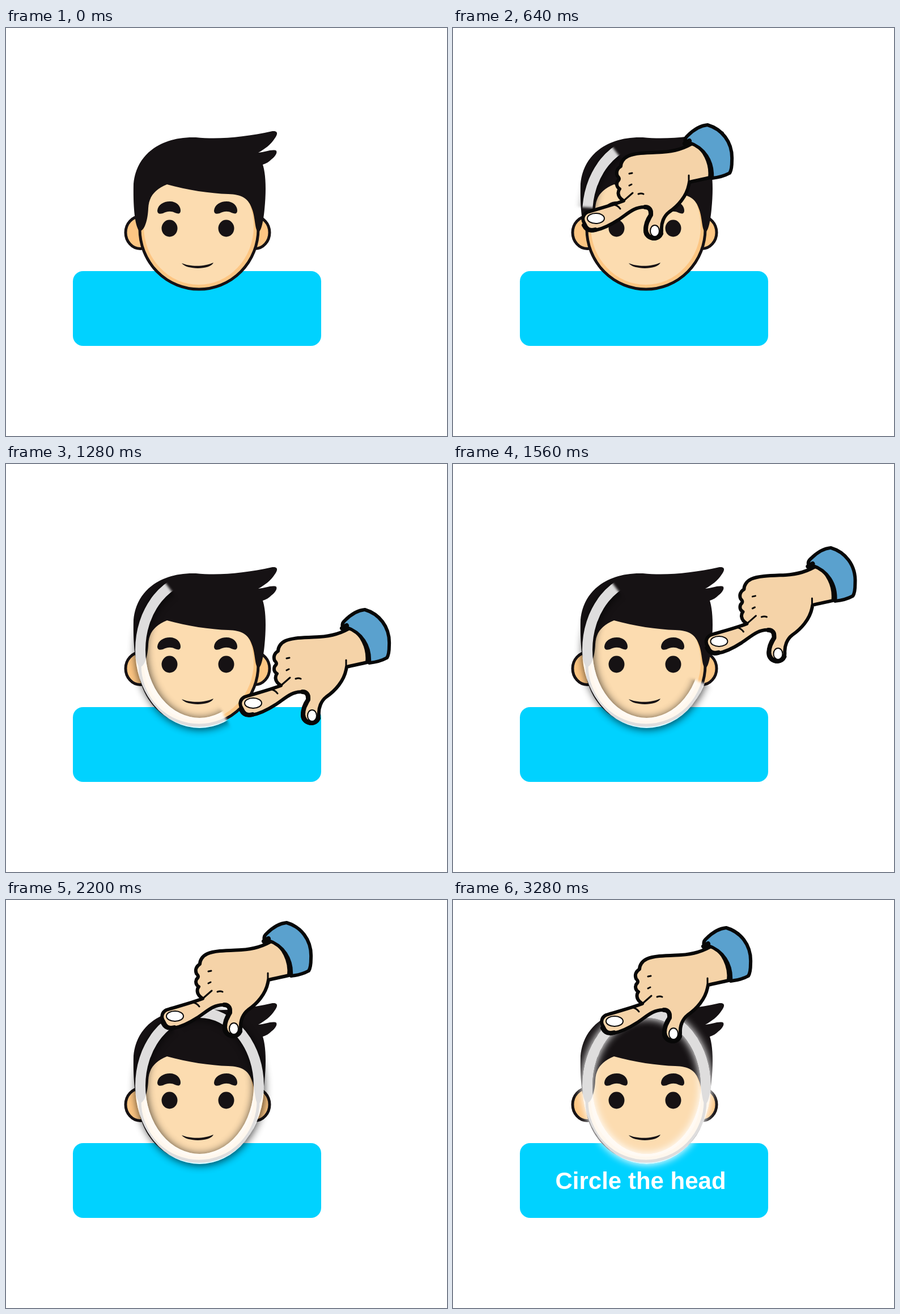
These frames come from a looping animation (778 px wide and 720 px high, 4.8 s). An HTML page:

```html
<!DOCTYPE html>
<html lang="en">
<head>
<meta charset="utf-8">
<title>Circle the head</title>
<style>
  html, body { margin: 0; width: 100%; height: 100%; overflow: hidden; background: #fff; }
  svg { display: block; width: 100%; height: 100%; }
  .ink { fill: #161214; }
  .outline { stroke: #161214; stroke-width: 5; }
  .skin { fill: #fcdcb0; }
  .shade { fill: #fdc683; }
  .band { fill: none; stroke: #fff; stroke-width: 18; }
  #hand { stroke: #080808; stroke-width: 6; stroke-linejoin: round; stroke-linecap: round; }
  #hand .crease { fill: none; stroke-width: 3; }
  #hand .heavy { fill: none; stroke-width: 8; }
  #hand .nail { fill: #fff; stroke-width: 2; }
  text { font: bold 42px "Liberation Sans", Arial, sans-serif; fill: #fff; }
</style>
</head>
<body>
<svg viewBox="0 0 778 720">
  <defs>
    <ellipse id="oval" cx="341.5" cy="328" rx="104.5" ry="129"/>
    <path id="brow" d="M267 322C268 312 278 306 289 306C301 306 308 314 308 322C308 329 303 328 298 326C291 322 282 324 277 327C270 329 267 327 267 322Z"/>
    <filter id="soft" filterUnits="userSpaceOnUse" x="0" y="0" width="778" height="720">
      <feGaussianBlur stdDeviation="2"/>
    </filter>
    <filter id="shadow" filterUnits="userSpaceOnUse" x="150" y="120" width="400" height="420">
      <feGaussianBlur in="SourceAlpha" stdDeviation="7.5"/>
      <feOffset dx="1" dy="2"/>
      <feComponentTransfer><feFuncA type="linear" slope=".75"/></feComponentTransfer>
      <feComposite operator="out" in2="SourceAlpha"/>
    </filter>
    <filter id="halo" filterUnits="userSpaceOnUse" x="150" y="120" width="400" height="420" color-interpolation-filters="sRGB">
      <feGaussianBlur stdDeviation="7.5"/>
      <feComponentTransfer><feFuncA type="linear" slope="1.15"/></feComponentTransfer>
      <feComposite operator="out" in2="SourceAlpha"/>
    </filter>
    <mask id="drawn" maskUnits="userSpaceOnUse" x="0" y="0" width="778" height="720">
      <path id="sweep" fill="none" stroke="#fff" stroke-width="90" filter="url(#soft)"/>
    </mask>
    <clipPath id="wipe"><rect id="wipeBox" x="181" y="460" width="0" height="70"/></clipPath>
  </defs>

  <rect x="118" y="429" width="438" height="132" rx="18" fill="#00d2ff"/>
  <text x="180.5" y="510" clip-path="url(#wipe)">Circle the head</text>

  <g id="head">
    <ellipse class="shade outline" cx="237" cy="361" rx="26" ry="28.5"/>
    <ellipse class="shade outline" cx="439" cy="361" rx="26" ry="28.5"/>
    <ellipse class="shade outline" cx="340.5" cy="355" rx="104.5" ry="106"/>
    <ellipse class="skin" cx="340" cy="350" rx="97" ry="103"/>
    <path class="ink" d="M235 358C228 350 224 320 225 275C229 226 270 191 335 193C375 197 420 193 470 182C480 181 480 187 474 195C467 206 456 214 445 220C457 219 467 214 476 216C480 219 475 227 468 232C463 237 459 239 453 241C459 260 459 290 456 320C454 342 450 360 445 360C439 356 440 338 435 322C428 299 415 294 392 293C360 292 320 286 284 276C262 285 252 298 251 318C250 342 243 360 235 358Z"/>
    <use href="#brow" class="ink"/>
    <use href="#brow" class="ink" x="100"/>
    <ellipse class="ink" cx="288.5" cy="353.5" rx="14" ry="15"/>
    <ellipse class="ink" cx="388.5" cy="353.5" rx="14" ry="15"/>
    <path class="ink" d="M310 415C325 421.500 350 421.500 366 414C361 427 318 427 310 415Z"/>
  </g>

  <g id="ring" mask="url(#drawn)">
    <g id="shade"><use href="#oval" class="band" filter="url(#shadow)"/></g>
    <use href="#oval" class="band" opacity=".86"/>
    <use href="#oval" class="band" id="glow" filter="url(#halo)"/>
  </g>

  <g id="hand">
    <path fill="#f5d3a8" d="M458 80C441 91 420 96 402 97C380 98 355 98 342 104C333 108 329 116 329 122C323 126 320 132 323 139C327 143 327 145 323 149C321 154 322 159 327 162C323 167 324 174 329 179L334 183C310 192 285 198 270 203C262 207 260 216 265 223C268 230 272 236 283 235C295 233 310 226 324 217C340 207 352 193 372 194C382 195 385 200 381 210C379 219 372 224 372 234C371 244 380 250 389 250C397 249 401 243 401 235C400 222 405 210 414 203C430 192 445 175 449 155L450 150C462 147 474 145 486 142C489 115 475 92 458 80Z"/>
    <path fill="#5aa1ce" d="M449 80C440 82 441 73 447 68C458 57 470 50 482 49C506 56 527 78 525 112C525 124 523 131 521 134C512 139 500 142 490 143C492 113 476 89 449 80Z"/>
    <path class="crease" d="M334 183L350 169M315 189Q324 191 328 197M344 135L349 134M344 156L348 154M360 171Q365 169 369 171M449 138L449 154"/>
    <path class="heavy" d="M264 226Q270 238 284 234M372 194Q383 194 382 208Q373 221 373 234Q374 248 388 249Q397 248 400 241M442 82L450 77"/>
    <ellipse class="nail" cx="285" cy="214" rx="15" ry="9"/>
    <ellipse class="nail" cx="389" cy="236" rx="8" ry="10"/>
  </g>
</svg>
<script>
const LOOP = 4800, STEP = 40;
const START_ANGLE = 238.6;
const oval = { x: 341.5, y: 328, rx: 104.5, ry: 129 };

// [time, dx, dy] of the hand
const handKeys = [
  [40, 0, 0], [300, -26, 46], [560, -38, 92], [640, -33, 122], [1000, 45, 237],
  [1120, 94, 303], [1280, 151, 208], [1480, 183, 130], [1680, 177, 53],
  [1840, 152, -4], [2020, 85, -27], [2200, 13, -9], [2240, 0, 0]
];
// [time, angle] of the leading end of the ring
const ringKeys = [
  [40, START_ANGLE], [640, 185], [1000, 116], [1280, 65],
  [1680, 8], [1840, -26], [2240, START_ANGLE - 360]
];

const $ = id => document.getElementById(id);
const clamp = (v, lo, hi) => Math.min(hi, Math.max(lo, v));
const progress = (t, from, to) => clamp((t - from) / (to - from), 0, 1);

// Smooth curve through the keys, for the value in the given column
function along(keys, t, col) {
  const last = keys.length - 1;
  t = clamp(t, keys[0][0], keys[last][0]);
  const i = Math.min(last - 1, keys.findLastIndex(k => k[0] <= t));
  const slope = n => {
    const a = keys[Math.max(0, n - 1)], b = keys[Math.min(last, n + 1)];
    return (b[col] - a[col]) / (b[0] - a[0]);
  };
  const a = keys[i], b = keys[i + 1], d = b[0] - a[0], u = (t - a[0]) / d, v = 1 - u;
  return v * v * (1 + 2 * u) * a[col] + u * u * (3 - 2 * u) * b[col]
    + u * v * d * (v * slope(i) - u * slope(i + 1));
}

function pointAt(deg) {
  const r = deg * Math.PI / 180;
  return `${oval.x + oval.rx * Math.cos(r)} ${oval.y + oval.ry * Math.sin(r)}`;
}

function arc(span) {
  const large = span > 180 ? 1 : 0;
  return `M${pointAt(START_ANGLE)}A${oval.rx} ${oval.ry} 0 ${large} 0 ${pointAt(START_ANGLE - span)}`;
}

function draw(t) {
  const shown = t >= 40 ? "visible" : "hidden";
  const glow = progress(t, 2240, 2680);
  $("hand").setAttribute("visibility", shown);
  $("ring").setAttribute("visibility", shown);
  $("hand").setAttribute("transform", `translate(${along(handKeys, t, 1)} ${along(handKeys, t, 2)})`);
  $("sweep").setAttribute("d", arc(clamp(START_ANGLE - along(ringKeys, t, 1), 0.01, 359.9)));
  $("glow").setAttribute("opacity", glow);
  $("shade").setAttribute("opacity", 1 - glow);
  $("wipeBox").setAttribute("width", 304 * progress(t, 2640, 3280));
}

const begin = performance.now();
function frame() {
  const t = (performance.now() - begin) % LOOP;
  draw(Math.floor(t / STEP) * STEP);
  requestAnimationFrame(frame);
}
draw(0);
requestAnimationFrame(frame);
</script>
</body>
</html>
```
